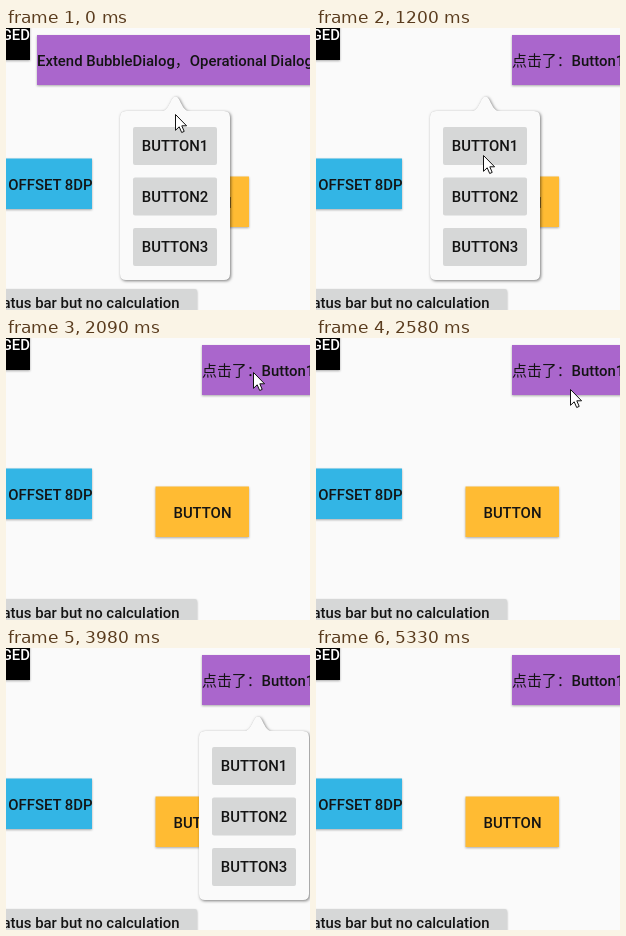
Write an HTML page that moves like this. It is 304 by 282 pixels and loops after 5.7 s.

```html
<!DOCTYPE html>
<html lang="zh-CN">
<head>
<meta charset="utf-8">
<title>Bubble dialog</title>
<style>
  html, body { margin: 0; width: 100%; height: 100%; overflow: hidden; background: #fafafa; }
  svg { display: block; width: 304px; height: 282px; }
  text { font: 500 14.9px Roboto, "Noto Sans CJK SC", "Noto Sans CJK", sans-serif; fill: #141414; }
  .cjk { font-family: "Noto Sans CJK SC", "Noto Sans CJK", sans-serif; font-weight: 400; }
  .raised { filter: drop-shadow(0 1px 1px rgba(0, 0, 0, .32)); }
  .pressed { filter: drop-shadow(0 3px 3px rgba(0, 0, 0, .35)); }
  .bubble { fill: #fafafa; filter: drop-shadow(0 0 .6px rgba(0, 0, 0, .15)) drop-shadow(1px 1px 1.5px rgba(0, 0, 0, .5)); }
</style>
</head>
<body>
<svg viewBox="0 0 304 282">
  <rect width="304" height="282" fill="#fafafa"/>
  <rect class="raised" x="-80" y="-18" width="104" height="50" fill="#000"/>
  <text x="24" y="12" text-anchor="end" style="fill:#fff">CHANGED</text>
  <rect class="raised" id="purple" y="7" height="50" fill="#aa66cc"/>
  <text id="intro" x="31" y="38">Extend BubbleDialog<tspan class="cjk">，</tspan>Operational Dialog</text>
  <text id="clicked" x="196" y="38"><tspan class="cjk">点击了：</tspan>Button1</text>
  <rect class="raised" x="-20" y="130.5" width="106" height="50.5" fill="#33b5e5"/>
  <text x="86.5" y="161.5" text-anchor="end">OFFSET 8DP</text>
  <rect class="raised" x="149.5" y="148.5" width="93.5" height="50.5" fill="#ffbb33"/>
  <text x="196.5" y="179.5" text-anchor="middle">BUTTON</text>
  <rect class="raised" x="-20" y="261" width="211" height="38" rx="2" fill="#d6d7d7"/>
  <text x="173.5" y="280" text-anchor="end">status bar but no calculation</text>
  <g id="dialog">
    <path class="bubble" id="shape"/>
    <g id="buttons"></g>
  </g>
  <path id="cursor" d="M.5 .5V16.3L4.2 12.8 6.7 18.5 9.2 17.4 6.8 11.8H11.6Z"
        fill="#fff" stroke="#111" stroke-linejoin="round"/>
</svg>
<script>
const LOOP = 5700;
const STEP = 70; // the cursor is redrawn at this interval
const $ = id => document.getElementById(id);
const ramp = (t, start, length) => Math.max(0, Math.min(1, (t - start) / length));
const show = (id, on) => { $(id).style.display = on ? "" : "none"; };

// Cursor stops: arrival time and place
const stops = [
  [0, 169, 86], [280, 166, 119], [770, 167, 127], [1610, 224, 126], [2030, 247, 34],
  [2520, 254, 51], [3010, 248, 106], [3920, 268, 292], [4620, 155, 78], [5320, 205, 300]
];

// Longer trips take longer; each ends exactly at its arrival time
function cursorAt(t) {
  const now = Math.floor(t / STEP) * STEP;
  return stops.reduce(([x, y], [arrival, toX, toY]) => {
    const trip = 200 + 1.2 * Math.hypot(toX - x, toY - y);
    const f = ramp(now, arrival - trip, trip);
    return [x + (toX - x) * f, y + (toY - y) * f];
  }, stops[0].slice(1)).map(Math.round);
}

function bubblePath(x, tip) {
  return `M${x + 6} 83H${tip - 14}C${tip - 6} 83 ${tip - 5} 68.5 ${tip} 68.5` +
    `S${tip + 6} 83 ${tip + 14} 83h${x + 90 - tip}q6 0 6 6v157q0 6 -6 6h-98q-6 0 -6 -6v-157q0 -6 6 -6Z`;
}

$("buttons").innerHTML = [1, 2, 3].map((n, i) => {
  const y = 99 + i * 50.5;
  return `<rect x="13" y="${y}" width="84" height="38" rx="2" fill="#d6d7d7"/>
    <text x="55" y="${y + 24}" text-anchor="middle">BUTTON${n}</text>`;
}).join("");

function draw(t) {
  const renamed = t >= 1190;
  const left = renamed ? 196 : 31;
  $("purple").setAttribute("x", left);
  $("purple").setAttribute("width", 308 - left);
  $("purple").setAttribute("class", t >= 2830 && t < 3190 ? "pressed" : "raised");
  show("intro", !renamed);
  show("clicked", renamed);

  const reopened = t >= 2500;
  const x = reopened ? 193 : 114;
  $("shape").setAttribute("d", bubblePath(x, reopened ? 252 : 169.5));
  $("buttons").setAttribute("transform", `translate(${x})`);
  $("dialog").style.opacity = 1 - ramp(t, 1880, 170) + ramp(t, 2830, 170) - ramp(t, 4790, 170);

  $("cursor").setAttribute("transform", `translate(${cursorAt(t)})`);
}

const began = performance.now();
function tick() {
  draw((performance.now() - began) % LOOP);
  requestAnimationFrame(tick);
}
tick();
</script>
</body>
</html>
```
